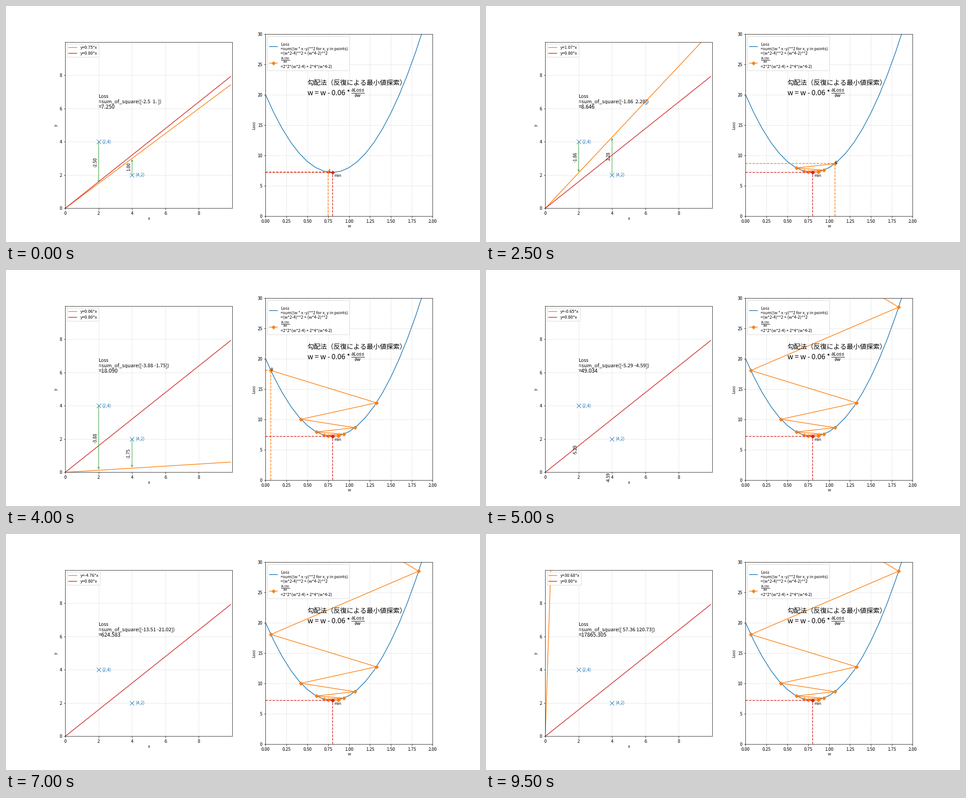
A matplotlib script for the animation above (10 s loop, 1058 by 529 pixels).

```python
import numpy as np
import matplotlib.pyplot as plt
from matplotlib.animation import FuncAnimation
from matplotlib.patches import FancyBboxPatch

W, H, DPI = 1058, 529, 72
STEPS, RATE = 20, 0.06
POINTS = np.array([[2, 4], [4, 2]])
BLUE, ORANGE, GREEN, RED = "C0", "C1", "C2", "C3"

plt.rcParams["font.family"] = ["Noto Sans CJK JP"]


def residuals(w):
    return w * POINTS[:, 0] - POINTS[:, 1]


def loss(w):
    return (2 * w - 4) ** 2 + (4 * w - 2) ** 2


def descend(w):
    path = [w]
    for _ in range(STEPS - 1):
        w -= RATE * (2 * 2 * (w * 2 - 4) + 2 * 4 * (w * 4 - 2))
        path.append(w)
    return np.array(path)


ws = descend(0.75)
losses = loss(ws)

fig, (fit, bowl) = plt.subplots(1, 2, figsize=(W / DPI, H / DPI), dpi=DPI)
fit.set(xlim=(0, 10), ylim=(0, 10), aspect="equal",
        xticks=range(0, 10, 2), yticks=range(0, 10, 2))
bowl.set(xlim=(0, 2), ylim=(0, 30),
         xticks=np.arange(0, 2.1, 0.25), yticks=range(0, 31, 5))
for ax in (fit, bowl):
    ax.grid(linestyle=":")
    ax.tick_params(labelsize=9.8)

# Overlay in pixel units, y downwards
page = fig.add_axes([0, 0, 1, 1], zorder=5)
page.set(xlim=(0, W), ylim=(H, 0))
page.axis("off")


def fit_px(x, y):
    return 132.25 + 37.27 * x, 453.5 - 37.27 * y


def bowl_px(x, y):
    return 579.5 + 186.35 * x, 470.8 - 13.577 * y


def put(x, y, s, size, **kw):
    kw = {"va": "baseline", "ha": "left", "zorder": 4, **kw}
    return page.text(x, y, s, fontsize=size, **kw)


def upright(x, y, s, size):
    return put(x, y, s, size, rotation=90, rotation_mode="anchor", ha="center")


def frame(x, y, w, h):
    box = FancyBboxPatch((x, y), w, h, boxstyle="round,pad=0,rounding_size=1.8",
                         fc="white", ec="0.8", lw=1, alpha=0.8, zorder=2)
    return page.add_patch(box)


def handle(x, y, color, marker=None):
    page.plot([x, x + 18], [y, y], color=color, zorder=3)
    if marker:
        page.plot([x + 9], [y], marker, color=color, zorder=3)


# Left plot
xs = np.arange(0, 10, 0.1)
guess, = fit.plot(xs, xs, color=ORANGE)
fit.plot(xs, 0.8 * xs, color=RED)
fit.plot(*POINTS.T, "x", color=BLUE, ms=10, mew=1)
arrows, gaps = [], []
for px, py in POINTS:
    arrows.append(fit.annotate("", xy=(px, py), xytext=(px, py),
                               arrowprops=dict(arrowstyle="->", color=GREEN)))
    tx, ty = fit_px(px, py)
    gaps.append(upright(tx - 4.7, ty, "", 9.8))
    put(tx + 7.4, ty + 3.3, f"({px},{py})", 9.7, color=BLUE)
put(319, 479, "x", 9.5, ha="center")
upright(114, 267.3, "y", 9.5)

put(206.8, 205.7, "Loss", 10.8)
squares = put(206.8, 217.8, "", 11.2)
total = put(206.8, 230.2, "", 11.9)

fit_box = frame(136.75, 85.3, 72, 29.5)
handle(140.35, 93, ORANGE)
handle(140.35, 106, RED)
guess_label = put(165.6, 96.4, "", 9.5)
put(165.6, 109.4, "y=0.80*x", 9.5)

# Right plot
grid = np.arange(0, 2, 0.1)
bowl.plot(grid, loss(grid), color=BLUE)
trail, = bowl.plot([], [], "-D", color=ORANGE)
across, = bowl.plot([], [], "--", color=ORANGE)
down, = bowl.plot([], [], "--", color=ORANGE)
bowl.plot([0, 0.8], [7.2, 7.2], "--", color=RED)
bowl.plot([0.8, 0.8], [0, 7.2], "--", color=RED)
bowl.plot([0.8], [7.2], "D", color=RED)
count = put(0, 0, "", 9.5)
put(732.3, 382.6, "min", 8.9)
put(766, 495.5, "w", 9.2, ha="center")
upright(556.5, 267.5, "Loss", 8.9)

put(672.7, 177.6, "勾配法（反復による最小値探索）", 14.8)
put(672.7, 199.6, "w = w - 0.06 *", 15.8)
GRADIENT = r"$\frac{\partial Loss}{\partial w}$"
put(770, 199.8, GRADIENT, 15)

frame(584, 68, 183, 77)
handle(587.6, 91.3, BLUE)
handle(587.6, 128.4, ORANGE, "D")
for y, s in [(89.2, "Loss"),
             (99.0, "=sum((w * x -y)**2 for x, y in points)"),
             (108.9, "=(w*2-4)**2 + (w*4-2)**2"),
             (139.6, "=2*2*(w*2-4) + 2*4*(w*4-2)")]:
    put(612.8, y, s, 9.2)
put(613, 125, GRADIENT, 9.5)


def update(i):
    w, value = ws[i], losses[i]
    errors = residuals(w)

    guess.set_ydata(w * xs)
    guess_label.set_text(f"y={w:.2f}*x")
    extent = guess_label.get_window_extent(fig.canvas.get_renderer())
    fit_box.set_width(extent.transformed(page.transData.inverted()).width + 33)
    squares.set_text(f"=sum_of_square({np.round(errors, 2)})")
    total.set_text(f"={value:.3f}")
    for (px, py), err, arrow, gap in zip(POINTS, errors, arrows, gaps):
        arrow.xy = (px, py + err)
        gap.set_text(f"{err:.2f}")
        y = fit_px(px, py + err / 2)[1]
        gap.set_y(y)
        gap.set_visible(-20 < y < H + 20)

    trail.set_data(ws[:i + 1], losses[:i + 1])
    across.set_data([0, w], [value, value])
    down.set_data([w, w], [0, value])
    x, y = bowl_px(w, value)
    count.set_position((x, y + 0.5))
    count.set_text(str(i + 1))
    count.set_visible(0 < x < W and 0 < y < H)
    return []


anim = FuncAnimation(fig, update, frames=STEPS, interval=500,
                     repeat=True, repeat_delay=0, blit=False)
plt.show()
```
